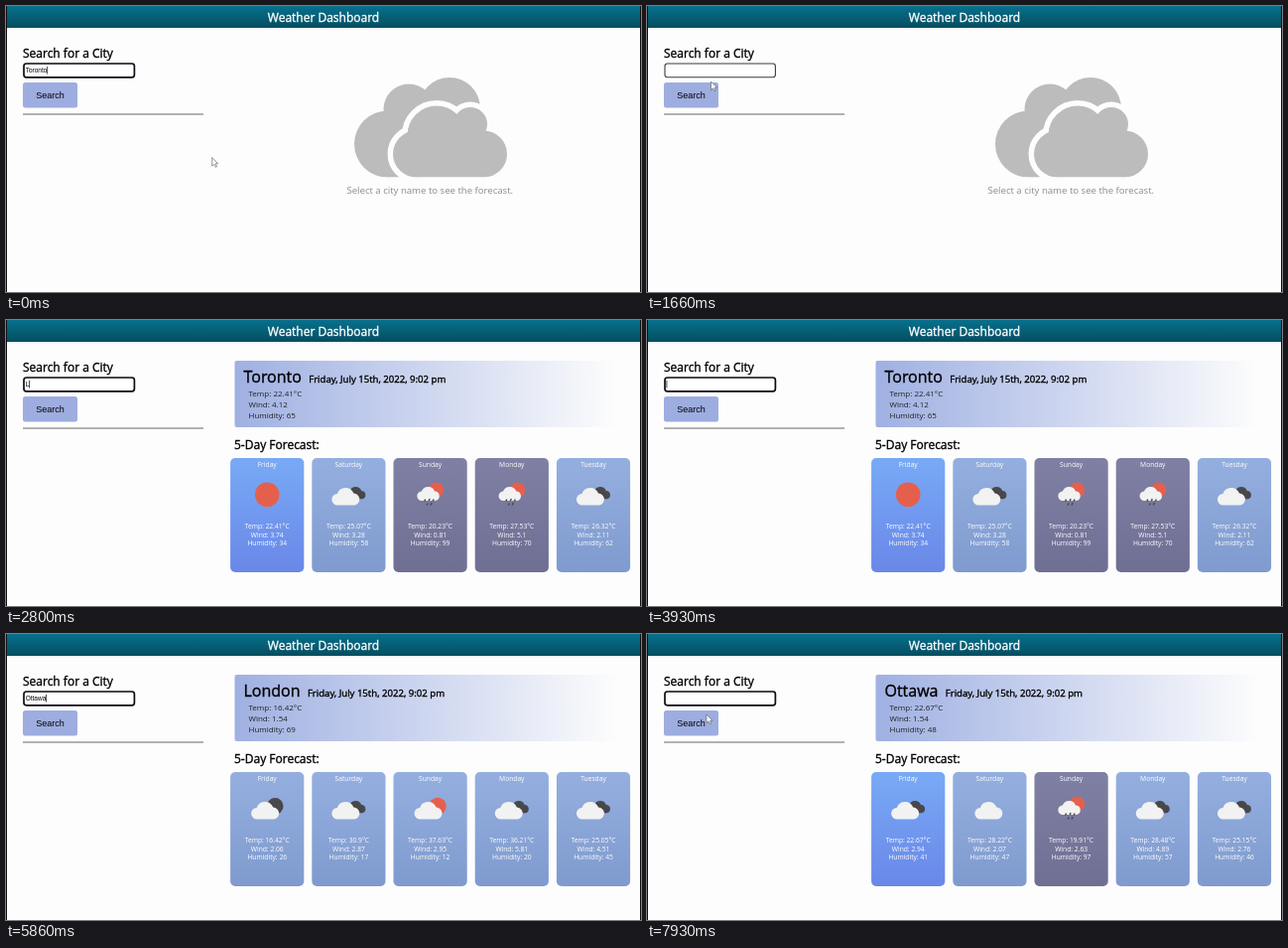
Write an HTML page that moves like this. It is 640 by 288 pixels and loops after 8000 ms.

```html
<!DOCTYPE html>
<html lang="en">
<head>
<meta charset="utf-8">
<title>Weather Dashboard</title>
<style>
html, body { margin: 0; width: 100%; height: 100%; overflow: hidden; background: #fdfdfd; }
svg { display: block; width: 100%; height: 100%; }
text { font-family: "Open Sans", "Noto Sans", sans-serif; white-space: pre; }
.bold { stroke: currentColor; stroke-width: .35px; }
.head { font-size: 12px; }
.ui { font-family: "Liberation Sans", Arial, sans-serif; }
.card text { font-size: 6.7px; fill: #fff; text-anchor: middle; }
</style>
</head>
<body>
<svg viewBox="0 0 640 288">
  <defs>
    <linearGradient id="bar" x2="0" y2="1"><stop stop-color="#07708d"/><stop offset="1" stop-color="#044e60"/></linearGradient>
    <linearGradient id="panel"><stop stop-color="#9fb0e2"/><stop offset=".97" stop-color="#fdfdfd"/></linearGradient>
    <linearGradient id="clear" x2="0" y2="1"><stop stop-color="#78aaf6"/><stop offset="1" stop-color="#6a87e8"/></linearGradient>
    <linearGradient id="cloudy" x2="0" y2="1"><stop stop-color="#94afdf"/><stop offset="1" stop-color="#7f9ace"/></linearGradient>
    <linearGradient id="rainy" x2="0" y2="1"><stop stop-color="#8080a4"/><stop offset="1" stop-color="#6f6f94"/></linearGradient>
    <path id="cloud" d="M-11 10.5A5.8 5.8 0 0 1-11.5-1.1A8.8 8.8 0 0 1 5-1.4A6 6 0 0 1 6 10.5Z"/>
    <g id="front">
      <circle cx="413.5" cy="149" r="23.5"/><circle cx="434" cy="130" r="29.5"/>
      <circle cx="468" cy="119" r="17"/><circle cx="481.5" cy="149" r="23.5"/>
      <path d="M413.5 125H481.5V172.5H413.5Z"/>
    </g>
  </defs>
  <rect width="640" height="288" fill="#fdfdfd"/>
  <rect width="640" height="22" fill="url(#bar)"/>
  <path d="M.5 0V288M639.5 0V288" stroke="#111"/>
  <text class="head bold" x="320" y="15.8" text-anchor="middle" fill="#fff" color="#fff">Weather Dashboard</text>
  <text class="head bold" x="17" y="51.5">Search for a City</text>
  <rect id="box" x="18" y="58" width="111.4" height="13.8" rx="2.5" fill="#fff"/>
  <text class="ui" x="19.7" y="67.1" font-size="6.5"><tspan id="typed"></tspan></text>
  <path id="caret" stroke="#000" stroke-width=".7"/>
  <rect x="17" y="77" width="55" height="25.5" rx="2.5" fill="#9eade0"/>
  <text class="ui" x="44.5" y="92.6" font-size="9" text-anchor="middle">Search</text>
  <path d="M17 109H199" stroke="#666"/>
  <g id="view"></g>
  <path id="mouse" d="M0 0V8.6L2 6.8L3.5 9.8L4.8 9.2L3.5 6.2H6Z" fill="#fff" stroke="#555" stroke-width=".6"/>
</svg>
<script>
const LOOP = 8000, BLINK = 533, RED = '#e5604c', DARK = '#48484a', LIGHT = '#f2f2f2';
const $ = id => document.getElementById(id);
const days = ['Friday', 'Saturday', 'Sunday', 'Monday', 'Tuesday'];

// Each day: background, icon, temperature, wind, humidity
const cities = {
  Toronto: { now: ['22.41', '4.12', 65], week: [
    ['clear', 'sun', '22.41', '3.74', 34], ['cloudy', 'broken', '25.07', '3.28', 58],
    ['rainy', 'rain', '20.23', '0.81', 99], ['rainy', 'rain', '27.53', '5.1', 70],
    ['cloudy', 'broken', '26.32', '2.11', 62]] },
  London: { now: ['16.42', '1.54', 69], week: [
    ['cloudy', 'night', '16.42', '2.06', 26], ['cloudy', 'broken', '30.9', '2.87', 17],
    ['cloudy', 'few', '37.63', '2.95', 12], ['cloudy', 'broken', '36.21', '5.81', 20],
    ['cloudy', 'broken', '25.05', '4.51', 45]] },
  Ottawa: { now: ['22.67', '1.54', 48], week: [
    ['clear', 'broken', '22.67', '2.94', 41], ['cloudy', 'single', '28.22', '2.07', 47],
    ['rainy', 'rain', '19.91', '2.63', 97], ['cloudy', 'broken', '28.48', '4.89', 57],
    ['cloudy', 'broken', '25.15', '2.76', 46]] }
};

const cloud = (x, y, s, fill) => `<use href="#cloud" transform="translate(${x} ${y}) scale(${s})" fill="${fill}"/>`;
const disc = (x, y, r, fill) => `<circle cx="${x}" cy="${y}" r="${r}" fill="${fill}"/>`;
const icons = {
  sun: disc(0, -.3, 12.3, RED),
  single: cloud(2, 0, 1, LIGHT),
  broken: cloud(9.3, -3, .7, DARK) + cloud(0, 0, 1, LIGHT),
  few: disc(7.5, -2.7, 8.6, RED) + cloud(1, 0, 1, LIGHT),
  night: disc(8, -2.7, 8.3, DARK) + cloud(1, 0, 1, LIGHT),
  rain: disc(6, -5, 7.6, RED) + cloud(.4, -2.5, .8, LIGHT) +
    `<path d="M-5 4.5l-1 2M-.5 4l-1 2M3.5 4.5l-1 2M-2.5 8.5l-1 2M1.5 8l-1 2.5" stroke="${DARK}" stroke-width="1.5"/>`
};

const lines = ([temp, wind, hum], x, y, step) =>
  [`Temp: ${temp}°C`, `Wind: ${wind}`, `Humidity: ${hum}`]
    .map((s, i) => `<text x="${x}" y="${y + i * step}">${s}</text>`).join('');

const card = ([bg, icon, ...data], i, loaded) => `
  <g class="card" transform="translate(${263.2 + i * 82.2} 0)">
    <rect x="-37.1" y="139" width="74.2" height="115" rx="5" fill="url(#${bg})"/>
    <text y="148.3">${days[i]}</text>
    ${loaded ? `<g transform="translate(0 176)">${icons[icon]}</g>` : ''}
    ${lines(data, 0, loaded ? 209.6 : 168.2, 8.9)}
  </g>`;

const welcome = () => `
  <g fill="#bcbcbc">
    <circle cx="384.5" cy="139" r="33.5"/><circle cx="406" cy="104" r="25.5"/>
    <circle cx="447" cy="103" r="31"/><path d="M384 106H430V172.5H384Z"/>
    <use href="#front" stroke="#fdfdfd" stroke-width="11"/><use href="#front"/>
  </g>
  <path d="M380 172.5H510V180H380Z" fill="#fdfdfd"/>
  <text x="427.3" y="189.2" text-anchor="middle" font-size="9.6" fill="#8c8c8c">Select a city name to see the forecast.</text>`;

const report = (name, missing) => `
  <rect x="230.5" y="41" width="398.5" height="67" rx="2" fill="url(#panel)"/>
  <text class="bold" x="239.5" y="63.4" font-size="16">${name}<tspan dx="7.3" font-size="9.6">Friday, July 15th, 2022, 9:02 pm</tspan></text>
  <g font-size="8" fill="#222">${lines(cities[name].now, 244.5, 76.6, 11)}</g>
  <text class="head bold" x="230" y="130.3">5-Day Forecast:</text>
  ${cities[name].week.map((d, i) => card(d, i, i >= missing)).join('')}`;

const views = [[0, welcome], [1720, () => report('Toronto', 0)], [3990, () => report('London', 0)],
  [6590, () => report('Ottawa', 2)], [6655, () => report('Ottawa', 0)]];

const typing = (word, times) => times.map((t, i) => [t, word.slice(0, i + 1)]);
const texts = [[0, 'Toronto'], [1600, ''],
  ...typing('London', [2795, 2995, 3055, 3395, 3460, 3525]), [3925, ''],
  ...typing('Ottawa', [4725, 4995, 5125, 5525, 5725, 5858]), [6590, '']];
const blur = 1600, focus = 1795;

// Pointer: time, x, y
const path = [[0, 207.7, 152.5], [60, 207.7, 152.5], [860, 55, 91], [1130, 55, 91], [1660, 64.5, 76],
  [1800, 66, 66], [7440, 68, 66], [7900, 60, 81], [8000, 60, 81]];

const latest = (list, t) => list.findLast(e => e[0] <= t);

function pointer(t) {
  const i = path.findIndex(p => p[0] > t), [t0, x0, y0] = path[i - 1], [t1, x1, y1] = path[i];
  let k = (t - t0) / (t1 - t0);
  k = k * k * (3 - 2 * k);
  return [x0 + (x1 - x0) * k, y0 + (y1 - y0) * k];
}

let shown;
function draw(t) {
  const view = latest(views, t);
  if (view !== shown) $('view').innerHTML = (shown = view)[1]();

  const focused = t < blur || t >= focus;
  $('box').setAttribute('stroke', focused ? '#0b0b14' : '#3a3a44');
  $('box').setAttribute('stroke-width', focused ? 1.7 : 1.1);
  const text = latest(texts, t)[1];
  $('typed').textContent = text;

  const keys = texts.filter(e => e[1] && e[0] <= t).pop()[0];
  const since = t - (t >= focus ? Math.max(keys, focus) : keys);
  const x = 19.9 + (text ? $('typed').getComputedTextLength() : 0);
  $('caret').setAttribute('d', focused && since % (2 * BLINK) < BLINK ? `M${x} 61V68.5` : '');

  // The arrow disappears over the text field
  const [mx, my] = pointer(t);
  $('mouse').setAttribute('transform', `translate(${mx} ${my})`);
  $('mouse').setAttribute('visibility', my > 72.5 ? 'visible' : 'hidden');
}

function tick() {
  draw(performance.now() % LOOP);
  requestAnimationFrame(tick);
}
tick();
</script>
</body>
</html>
```
